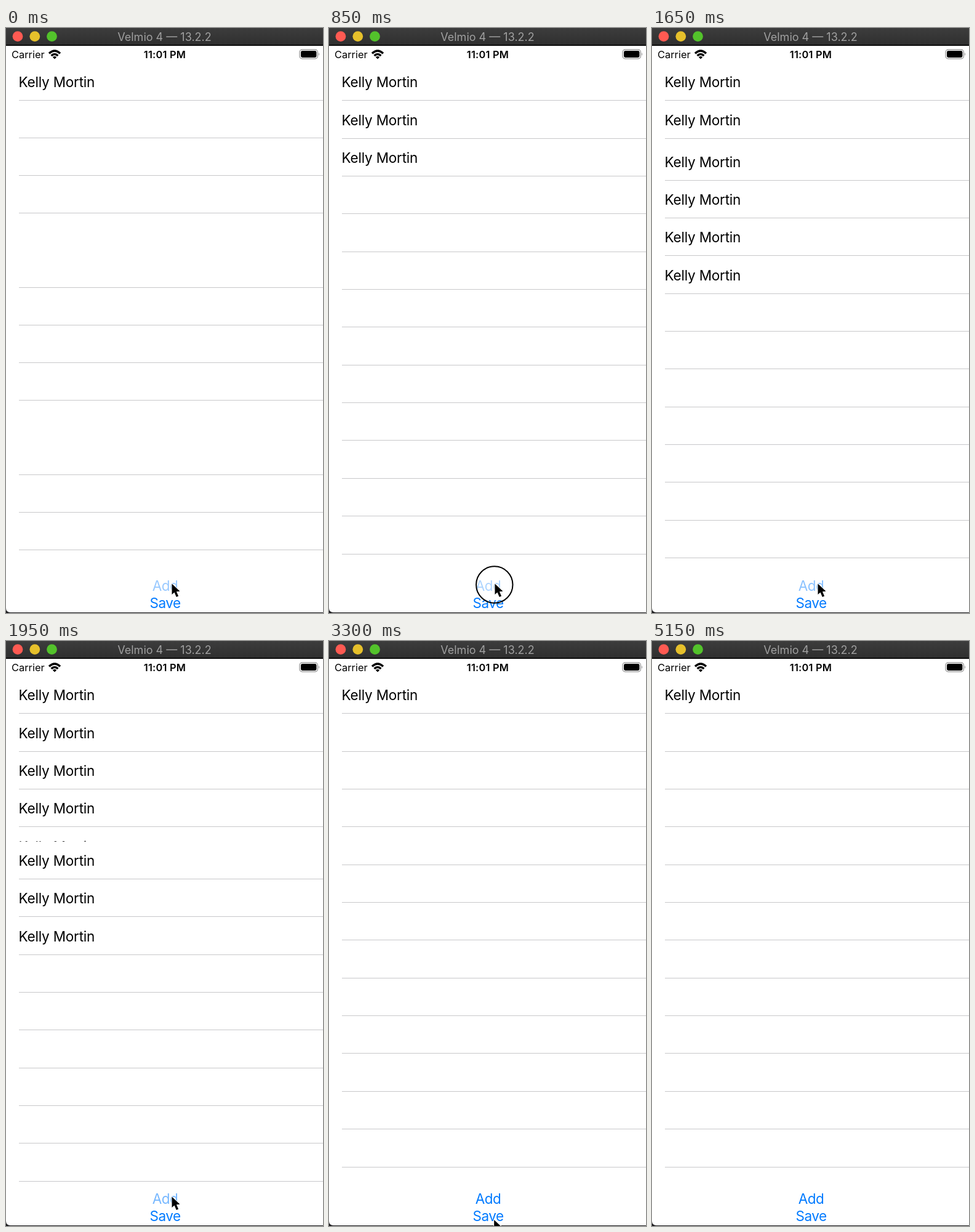
An HTML page for the animation above (5.2 s loop, 515x950 px).

```html
<!DOCTYPE html>
<html lang="en">
<head>
<meta charset="utf-8">
<title>List demo</title>
<style>
  html, body { margin: 0; width: 100%; height: 100%; overflow: hidden; background: #fff; }
  svg { display: block; width: 515px; height: 950px; font-family: Inter, Roboto, sans-serif; }
  .cell text { font-size: 22.5px; letter-spacing: -0.2px; }
  .button { font-size: 22.5px; letter-spacing: -0.5px; fill: #007aff; text-anchor: middle; }
  .status { font-size: 16.4px; }
</style>
</head>
<body>
<svg viewBox="0 0 515 950">
  <defs>
    <linearGradient id="bar" x2="0" y2="1">
      <stop offset="0" stop-color="#3d3d3d"/>
      <stop offset="1" stop-color="#2f2f2f"/>
    </linearGradient>
    <clipPath id="view"><rect y="57" width="515" height="833"/></clipPath>
  </defs>

  <rect width="515" height="950" fill="#1c1c1e"/>
  <path d="M0 28H515V949H7Q0 949 0 942Z" fill="#fff"/>
  <g id="list" clip-path="url(#view)"></g>

  <rect width="515" height="28" fill="url(#bar)"/>
  <rect y="27" width="515" height="2" fill="#0c0c0c"/>
  <circle cx="19" cy="13.6" r="8.4" fill="#ff5a52"/>
  <circle cx="46.8" cy="13.6" r="8.4" fill="#e6c02b"/>
  <circle cx="74.5" cy="13.6" r="8.4" fill="#53c22b"/>
  <text x="257.5" y="21" font-size="18" fill="#a0a0a0" text-anchor="middle">Velmio 4 — 13.2.2</text>

  <text class="status" x="9" y="49">Carrier</text>
  <g fill="none" stroke="#000" stroke-width="3.4">
    <path d="M70 41.2Q79 32.8 88 41.2"/>
    <path d="M73.6 45Q79 40 84.4 45"/>
  </g>
  <path d="M75.8 47.3Q79 44.8 82.2 47.3L79 50.5Z"/>
  <text class="status" x="258" y="49" font-weight="600" letter-spacing=".2" text-anchor="middle">11:01 PM</text>
  <rect x="477" y="35.2" width="29.4" height="14.6" rx="4" fill="none" stroke="#8c8c8c" stroke-width="1.2"/>
  <rect x="479" y="37" width="25.4" height="11" rx="2.4"/>
  <path d="M508 40Q510 42.5 508 45Z" fill="#8c8c8c"/>

  <text id="add" class="button" x="258.5" y="914.4">Add</text>
  <text id="save" class="button" x="258.5" y="942.4">Save</text>
  <circle id="ring" r="29.7" fill="#fff" fill-opacity=".15" stroke="#000" stroke-width="2"/>
  <path id="cursor" d="M0 0V17.5L4 13.8L7.3 21.3L10.6 19.9L7.4 12.6L13 12.2Z"
    stroke="#fff" stroke-width="1.8" paint-order="stroke" stroke-linejoin="round"/>
</svg>
<script>
const LOOP = 5200;
const NAME = 'Kelly Mortin';
const TOP = 56.3, PITCH = 61.35, SLOTS = 15;
const SLIDE = 240;
// [release time, index of the new row]
const ADDS = [[282, 0], [560, 1], [858, 1], [1105, 3], [1352, 2], [1600, 2], [1850, 4]];
const CLEAR = { start: 2950, time: 300, kept: 3, rows: 8 };
const SAVE_UP = 2800;
// [time, x, y] of the pointer tip
const PATH = [[0, 269.5, 902.6], [2220, 269.5, 902.6], [2440, 268, 940], [4430, 268.5, 940], [4590, 264, 953], [LOOP, 264, 953]];

const byId = id => document.getElementById(id);
const list = byId('list'), ring = byId('ring'), cursor = byId('cursor');
const clamp = v => Math.min(1, Math.max(0, v));
const ease = v => (1 - Math.cos(Math.PI * clamp(v))) / 2;
const mix = (a, b, k) => a + (b - a) * k;
const slotTop = slot => TOP + PITCH * slot;

function node(tag, attrs, parent) {
  const el = document.createElementNS('http://www.w3.org/2000/svg', tag);
  for (const key in attrs) el.setAttribute(key, attrs[key]);
  return parent.appendChild(el);
}

// The fill starts below the previous cell's separator.
const pool = Array.from({ length: 25 }, () => {
  const group = node('g', { class: 'cell' }, list);
  node('rect', { y: 1, width: 515, height: 62, fill: '#fff' }, group);
  node('rect', { x: 21, y: 61, width: 494, height: 1, fill: '#c8c8ca' }, group);
  const label = node('text', { x: 20.5, y: 40 }, group);
  label.textContent = NAME;
  return { group, label };
});

// Cells in stacking order, lowest first.
function cellsAt(t) {
  const cells = [];
  const put = (y, text, alpha = 1) => cells.push({ y, text, alpha });

  if (t < ADDS[0][0]) {
    const e = ease(t / SLIDE);
    for (let i = 1; i < SLOTS; i++) put(mix(56.6 + 60.77 * (i - 1), slotTop(i), e), false);
    put(slotTop(0), true);
  } else if (t < CLEAR.start) {
    const done = ADDS.filter(a => a[0] <= t).length;
    const [start, index] = ADDS[done - 1];
    const e = ease((t - start) / SLIDE);
    put(slotTop(index), true, clamp(e * 2));
    for (let i = 0; i < SLOTS; i++) {
      if (i !== index) put(slotTop(i < index ? i : i - 1 + e), i <= done);
    }
  } else {
    const { start, time, kept, rows } = CLEAR;
    const e = ease((t - start) / time);
    for (let i = 0; i < rows; i++) if (i !== kept && e < 1) put(slotTop(i), true, 1 - e);
    for (let i = 1; i < SLOTS; i++) put(slotTop(mix(i + rows - 1, i, e)), false);
    put(slotTop(mix(kept, 0, e)), true);
  }
  return cells;
}

function pointerAt(t) {
  const i = PATH.findIndex(p => p[0] > t);
  const [t0, x0, y0] = PATH[i - 1], [t1, x1, y1] = PATH[i];
  const e = ease((t - t0) / (t1 - t0));
  return [mix(x0, x1, e), mix(y0, y1, e)];
}

const held = (t, up, hold) => t >= up - hold && t < up;

// Dimmed while held, then recovers after release.
function buttonAlpha(t, releases, hold) {
  if (releases.some(up => held(t, up, hold))) return 0.38;
  const last = releases.filter(up => up <= t).pop();
  return last === undefined ? 1 : mix(0.38, 1, clamp((t - last) / 400));
}

const addUps = [-15, ...ADDS.map(a => a[0])];

function render(t) {
  const cells = cellsAt(t);
  pool.forEach(({ group, label }, i) => {
    const cell = cells[i];
    group.style.display = cell ? '' : 'none';
    if (!cell) return;
    group.setAttribute('transform', `translate(0 ${Math.round(cell.y)})`);
    group.setAttribute('opacity', cell.alpha);
    label.style.display = cell.text ? '' : 'none';
  });

  byId('add').setAttribute('opacity', buttonAlpha(t, addUps, 100));
  byId('save').setAttribute('opacity', buttonAlpha(t, [SAVE_UP], 180));

  const [x, y] = pointerAt(t);
  cursor.setAttribute('transform', `translate(${x} ${y})`);
  ring.setAttribute('transform', `translate(${x - 0.7} ${y + 1.4})`);
  const pressed = addUps.some(up => held(t, up, 100)) || held(t, SAVE_UP, 180);
  ring.style.display = pressed ? '' : 'none';
}

const begin = performance.now();
function tick() {
  render((performance.now() - begin) % LOOP);
  requestAnimationFrame(tick);
}
render(0);
requestAnimationFrame(tick);
</script>
</body>
</html>
```
